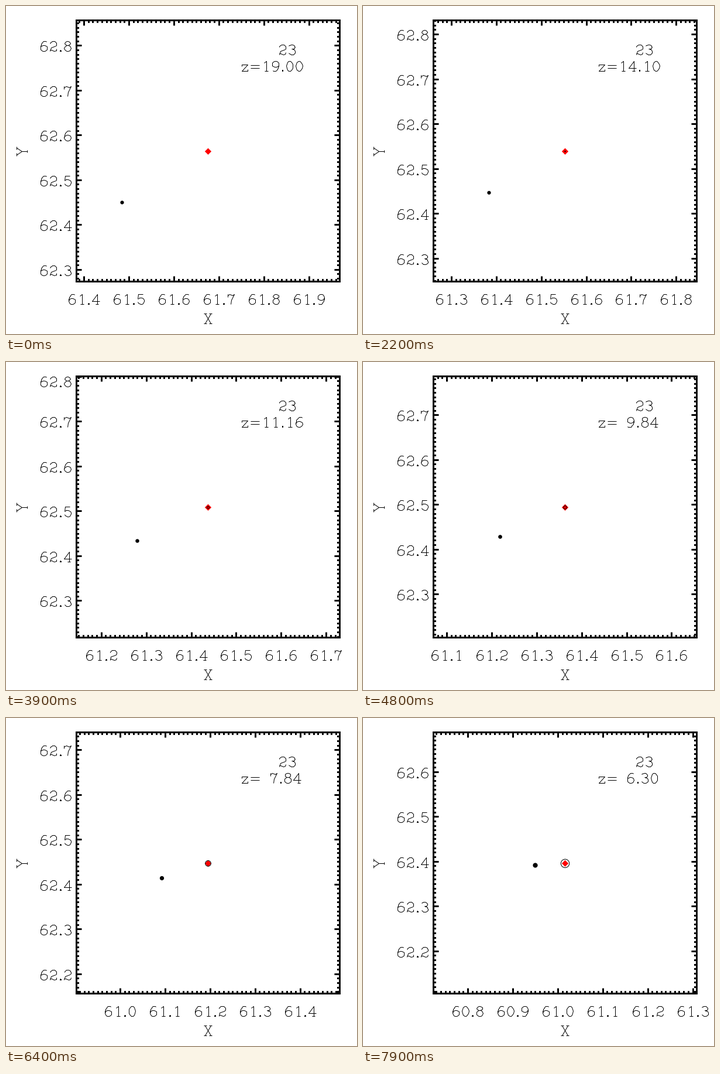
A matplotlib script that plays this animation: 600 px wide and 560 px high, repeating every 8000 ms.

```python
import numpy as np
import matplotlib.pyplot as plt
from matplotlib.animation import FuncAnimation
from matplotlib.collections import LineCollection
from matplotlib.patches import Circle, RegularPolygon, Rectangle

W, H, FRAMES = 600, 560, 80
PX = 0.72                                  # one pixel in points at 100 dpi
LEFT, RIGHT, TOP, BOTTOM = 120.5, 570.5, 24.5, 470.5
MIDX, MIDY = (LEFT + RIGHT) / 2, (TOP + BOTTOM) / 2
SX, SY = 769, 765                          # pixels per data unit
UNIT = 0.81                                # pixels per glyph unit


def pix(v):
    """Centre of the pixel that holds v."""
    return np.floor(v) + 0.5


# ---- single-stroke lettering, 21 units tall, baseline at 0 ----
def line(*xy):
    return [np.array(xy, float).reshape(-1, 2)]


def arc(cx, cy, rx, ry, a0=0, a1=360):
    t = np.radians(np.linspace(a0, a1, 15))
    return [np.column_stack([cx + rx * np.cos(t), cy + ry * np.sin(t)])]


def bar(x, y, half=3):
    return line(x - half, y, x + half, y)


def turned(strokes):
    return [(20, 21) - s for s in strokes]


def glyph(c):
    match c:
        case "0": return arc(10, 10.5, 7, 10.5)
        case "1": return line(6, 17, 11, 21, 11, 0) + bar(11, 0, 4)
        case "2": return (arc(10, 15, 7, 6, 170, -40)
                          + line(15.4, 11, 5, 7, 3, 0)
                          + line(3, 2, 6, 3, 12, 0, 16, 1, 17, 5))
        case "3": return (arc(9.5, 16.5, 6.5, 4.5, 160, -90)
                          + arc(10, 6, 7, 6, 90, -160))
        case "4": return line(13, 0, 13, 21, 2, 6, 18, 6) + bar(13, 0)
        case "5": return line(15, 21, 5, 21, 4, 11) + arc(10, 7, 7, 7, 140, -160)
        case "6": return arc(10, 6.5, 7, 6.5) + arc(12, 7, 9, 14, 65, 180)
        case "7": return (line(3, 15, 3, 21)
                          + line(3, 18, 7, 21, 13, 18, 17, 21, 11, 9, 10, 0))
        case "8": return arc(10, 16.5, 6, 4.5) + arc(10, 6, 7, 6)
        case "9": return turned(glyph("6"))
        case ".": return arc(5, 1, 1, 1)
        case "=": return bar(13, 12, 9) + bar(13, 6, 9)
        case "z": return line(3, 10, 3, 14, 15, 14, 3, 0, 15, 0, 15, 4)
        case "X":
            half = line(4, 21, 16, 0) + bar(4, 21) + bar(16, 21)
            return half + [(20, 21) * np.array([1, 1]) - s * (1, 1)
                           for s in half[1:]] + line(16, 21, 4, 0)
        case "Y": return (line(3, 21, 10, 10, 10, 0) + line(17, 21, 10, 10)
                          + bar(3, 21) + bar(17, 21) + bar(10, 0))
    return []


GLYPHS = {c: glyph(c) for c in "0123456789.=zXY "}
ADVANCE = {".": 10, "=": 26, "z": 18, " ": 16}


def text(s, x, y, center=False, upright=False):
    """Strokes of s in stage pixels, baseline starting at (x, y)."""
    widths = [ADVANCE.get(c, 20) for c in s]
    pen = -sum(widths) / 2 if center else 0
    out = []
    for c, w in zip(s, widths):
        for stroke in GLYPHS[c]:
            u, v = (stroke[:, 0] + pen) * UNIT, stroke[:, 1] * UNIT
            pts = (x - v, y - u) if upright else (x + u, y - v)
            out.append(pix(np.column_stack(pts)))
        pen += w
    return out


# ---- motion ----
KEYS = np.array([0, 14, 29, 39, 48, 64, 79])
F = np.arange(FRAMES)
T = F / (FRAMES - 1)


def track(*v):
    """Smooth curve through the key values, one sample per frame."""
    v = np.array(v)
    m = np.gradient(v, KEYS)
    i = np.clip(np.searchsorted(KEYS, F, "right") - 1, 0, len(KEYS) - 2)
    h = KEYS[i + 1] - KEYS[i]
    t = (F - KEYS[i]) / h
    ease = t * t * (3 - 2 * t)
    return (v[i] + (v[i + 1] - v[i]) * ease
            + h * t * (1 - t) * (m[i] * (1 - t) - m[i + 1] * t))


center_x = track(61.6756, 61.5979, 61.5091, 61.437, 61.3627, 61.195, 61.0158)
center_y = track(62.5651, 62.5503, 62.529, 62.5096, 62.4951, 62.448, 62.397)
dot_x = track(198, 211, 218, 224, 234, 266, 294) + 0.5
dot_y = track(335, 323, 314, 305, 298, 273, 251) + 0.5
dot_r = 3.1 + T**3
ring_r = 7.2 * T**1.9
redshift = 20 * np.exp(-0.01276 * F) - 1   # expansion grows exponentially


def ticks(mid, half):
    """Multiples of 0.01 in view: value, offset from mid, tick length, major?"""
    first, last = np.ceil((mid - half) * 100), np.floor((mid + half) * 100)
    for n in range(int(first), int(last) + 1):
        major = n % 10 == 0
        yield n / 100, n / 100 - mid, 9 if major else 4.5, major


# ---- stage ----
fig = plt.figure(figsize=(W / 100, H / 100), dpi=100, facecolor="white")
ax = fig.add_axes([0, 0, 1, 1])
ax.set(xlim=(0, W), ylim=(H, 0))
ax.axis("off")


def strokes_layer(width, z):
    layer = LineCollection([], colors="black", linewidths=width * PX,
                           snap=False, zorder=z)
    return ax.add_collection(layer, autolim=False)


tick_lines, letters = strokes_layer(3, 2), strokes_layer(1, 4)
ax.add_patch(Rectangle((LEFT, TOP), RIGHT - LEFT, BOTTOM - TOP, fill=False,
                       lw=3 * PX, snap=False, zorder=3))
ax.add_patch(RegularPolygon((MIDX, 248.3), 4, radius=5.6, orientation=np.pi / 4 * 0,
                            fc="red", ec="none", zorder=5))
ring = ax.add_patch(Circle((MIDX, 248.3), 1, fill=False, lw=PX, zorder=6))
dot = ax.add_patch(Circle((0, 0), 3, fc="black", ec="none", zorder=5))

FIXED = (text("23", 465, 83.5) + text("X", MIDX, 542.5, center=True)
         + text("Y", 36, 248.5, center=True, upright=True))


def update(f):
    segs, strokes = [], FIXED + text(f"z={redshift[f]:5.2f}", 401, 111.5)
    for value, off, size, major in ticks(center_x[f], (RIGHT - LEFT) / 2 / SX):
        x = pix(MIDX + off * SX)
        segs += [[(x, BOTTOM), (x, BOTTOM - size)], [(x, TOP), (x, TOP + size)]]
        if major:
            strokes += text(f"{value:.1f}", x, 509.5, center=True)
    for value, off, size, major in ticks(center_y[f], (BOTTOM - TOP) / 2 / SY):
        y = pix(MIDY - off * SY)
        segs += [[(LEFT, y), (LEFT + size, y)], [(RIGHT, y), (RIGHT - size, y)]]
        if major:                          # end labels stay inside the frame
            strokes += text(f"{value:.1f}", 57, np.clip(y + 10, 42.5, BOTTOM))

    tick_lines.set_segments(segs)
    letters.set_segments(strokes)
    dot.center, dot.radius = (dot_x[f], dot_y[f]), dot_r[f]
    ring.radius = ring_r[f]
    ring.set_visible(f > 0)
    return tick_lines, letters, dot, ring


anim = FuncAnimation(fig, update, frames=FRAMES, interval=100, repeat=True,
                     repeat_delay=0, blit=False)
plt.show()
```
